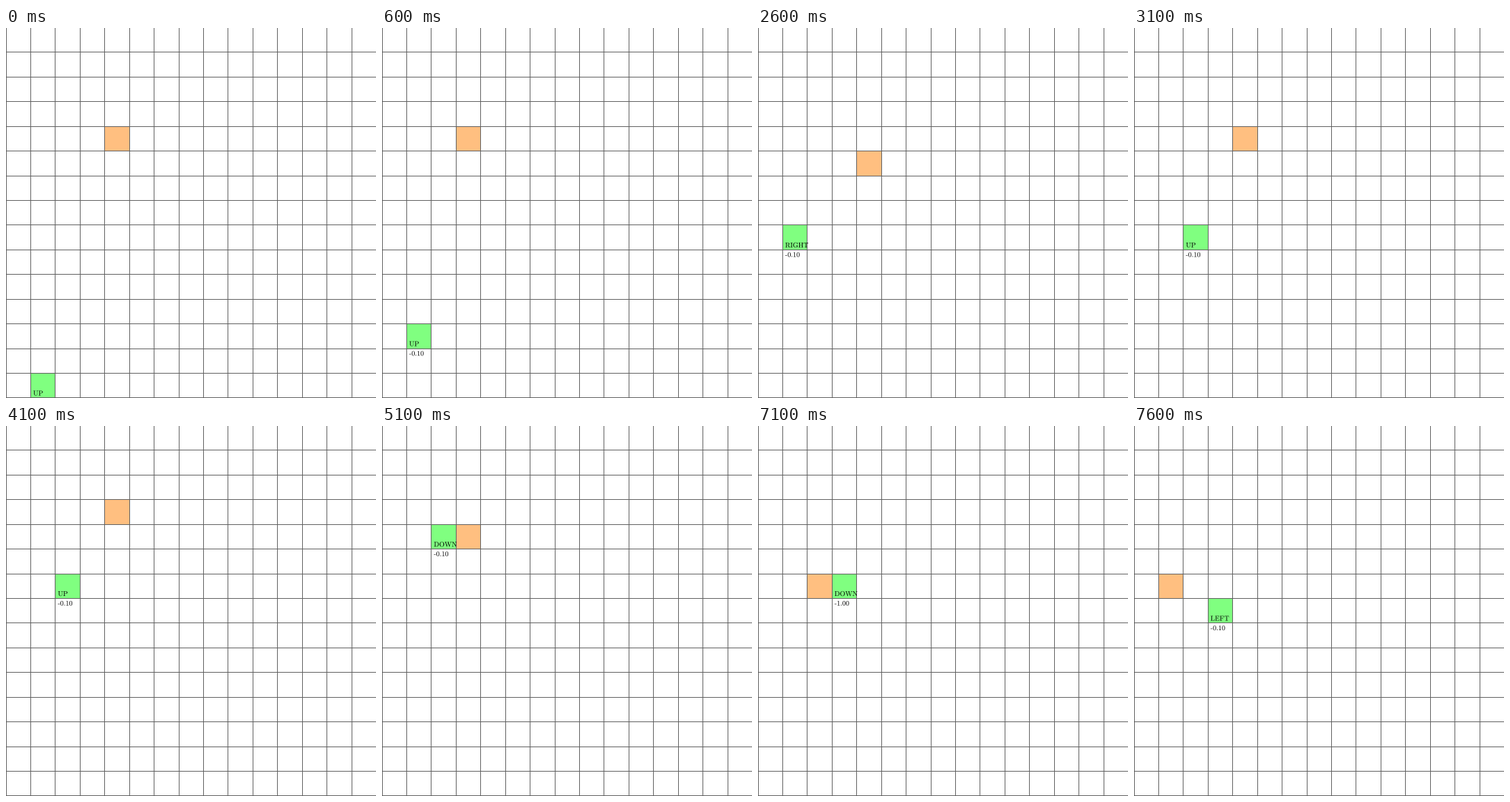
Animation, 531 px wide and 531 px high, one loop 8000 ms. Source, as a matplotlib script:

```python
import math

import matplotlib.pyplot as plt
from matplotlib.animation import FuncAnimation
from matplotlib.patches import PathPatch, Rectangle
from matplotlib.path import Path
from matplotlib.textpath import TextPath
from matplotlib.transforms import Affine2D

plt.rcParams["mathtext.fontset"] = "cm"

SIZE = 531
DPI = 72
CELLS = 15
CELL = 35.43          # 1.25 cm at 72 dpi
FONT = 10
LINE = "#606060"
GREEN = (0.5, 1.0, 0.5)
ORANGE = (1.0, 0.75, 0.5)

MOVES = {"U": (0, -1), "D": (0, 1), "L": (-1, 0), "R": (1, 0), ".": (0, 0)}
NAMES = {"U": "UP", "D": "DOWN", "L": "LEFT", "R": "RIGHT"}
ACTIONS = "UUUUUURUUUUDRDLDL"
DRIFT = ".LLRDRUU.LDLD.DL"


def shift(cell, move):
    dx, dy = MOVES[move]
    return cell[0] + dx, cell[1] + dy


def simulate():
    """List (agent, target, action, reward) for every step."""
    agent, target, reward = (1, 14), (4, 4), ""
    steps = [(agent, target, ACTIONS[0], reward)]
    for i, drift in enumerate(DRIFT):
        target = shift(target, drift)
        goal = shift(agent, ACTIONS[i])
        if goal == target:
            reward = "1.00"       # bumped, stays in place
        else:
            agent, reward = goal, "0.10"
        steps.append((agent, target, ACTIONS[i + 1], reward))
    return steps


def edge_x(col):
    return math.floor(col * CELL)


def edge_y(row):
    return math.floor(SIZE - (CELLS - row) * CELL)


def place(rect, cell):
    col, row = cell
    x, y = edge_x(col), edge_y(row)
    rect.set_bounds(x, y, edge_x(col + 1) - x, edge_y(row + 1) - y)


def roman(text, x=0):
    return TextPath((x, 0), r"$\mathrm{%s}$" % text, size=FONT)


def negative(text):
    """Number with a text hyphen in front, as mathtext would set a minus."""
    box = Affine2D().scale(0.265 * FONT, 0.058 * FONT)
    box.translate(0.011 * FONT, 0.187 * FONT)
    hyphen = box.transform_path(Path.unit_rectangle())
    return Path.make_compound_path(hyphen, roman(text, FONT / 3))


def write(patch, path, x, baseline):
    flip = Affine2D().scale(1, -1).translate(x, baseline)
    patch.set_path(flip.transform_path(path))


steps = simulate()
words = {key: roman(name) for key, name in NAMES.items()}
rewards = {text: negative(text) for text in ("0.10", "1.00")}

fig = plt.figure(figsize=(SIZE / DPI, SIZE / DPI), dpi=DPI, facecolor="white")
ax = fig.add_axes([0, 0, 1, 1])
ax.set_xlim(0, SIZE)
ax.set_ylim(SIZE, 0)
ax.axis("off")

grid = dict(color=LINE, lw=1, snap=False, zorder=2)
for k in range(CELLS):
    ax.axvline(edge_x(k) + 0.5, **grid)
for k in range(1, CELLS + 1):
    ax.axhline(min(edge_y(k), SIZE - 1) + 0.5, **grid)

target_box = ax.add_patch(Rectangle((0, 0), 1, 1, fc=ORANGE, lw=0, zorder=1))
agent_box = ax.add_patch(Rectangle((0, 0), 1, 1, fc=GREEN, lw=0, zorder=1))
ink = dict(fc="black", lw=0, snap=False, zorder=3)
action_text = ax.add_patch(PathPatch(words["U"], **ink))
reward_text = ax.add_patch(PathPatch(rewards["0.10"], **ink))


def draw(frame):
    agent, target, action, reward = steps[(frame + 4) // 5]
    place(target_box, target)
    place(agent_box, agent)

    x = (agent[0] + 0.1) * CELL
    bottom = SIZE - (CELLS - 1 - agent[1]) * CELL
    write(action_text, words[action], x, bottom - 0.1 * CELL)
    reward_text.set_visible(bool(reward))
    if reward:
        write(reward_text, rewards[reward], x, bottom + 0.285 * CELL)
    return target_box, agent_box, action_text, reward_text


anim = FuncAnimation(fig, draw, frames=80, interval=100,
                     init_func=lambda: draw(0), repeat=True, repeat_delay=0)
plt.show()
```
